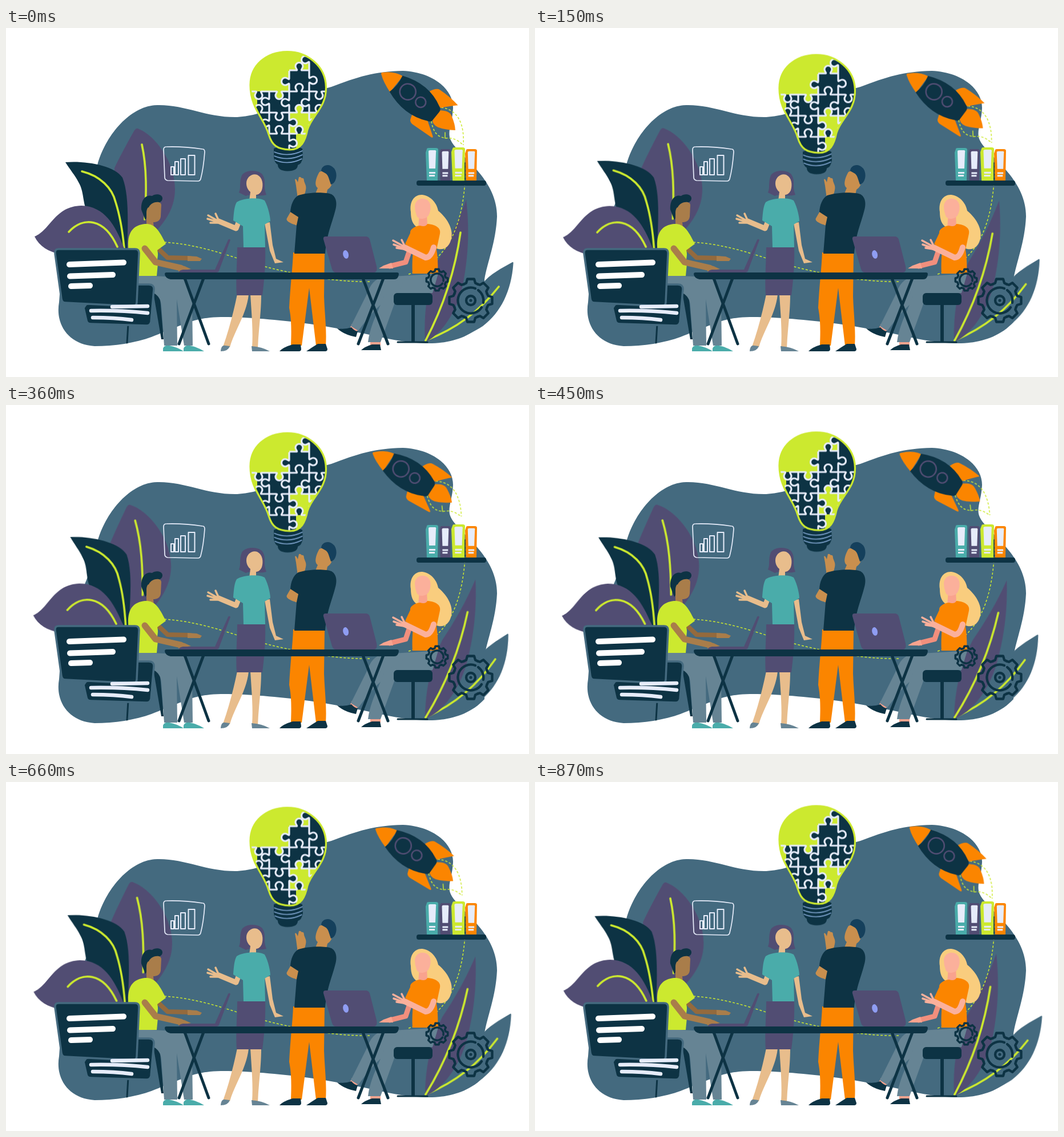
An HTML page without scripts that plays this animation: 916 by 611 pixels, repeating every 900 ms.

```html
<!DOCTYPE html>
<html lang="en">
<head>
<meta charset="utf-8">
<title>Team idea</title>
<style>
  html, body { margin: 0; width: 100%; height: 100%; overflow: hidden; background: #fff; }
  svg { display: block; width: 916px; height: 611px; }
  .blue { fill: #446a7f; } .dark { fill: #0d3344; } .purple { fill: #514d73; } .lime { fill: #cce92f; }
  .teal { fill: #4aacaa; } .orange { fill: #fb8500; } .grey { fill: #668494; }
  .tan { fill: #a97d4a; } .bronze { fill: #c98f4e; } .peach { fill: #e8bd8c; } .pink { fill: #f9a38e; } .paper { fill: #e6ecfa; }
  .line { fill: none; stroke-linecap: round; stroke-linejoin: round; }
  .ink { stroke: #0d3344; } .vein { stroke: #cce92f; stroke-width: 3.6; } .pale { stroke: #e6ecfa; }
  .dash { stroke: #cce92f; stroke-width: 1.5; stroke-dasharray: 4 3; stroke-linecap: butt; }

  .early, .mid, .late { animation: 900ms linear infinite; }
  .early { animation-name: early; }
  .mid { animation-name: mid; }
  .late { animation-name: late; }
  @keyframes early { 33.3% { transform: var(--to); } }
  @keyframes mid { 52% { transform: var(--to); } }
  @keyframes late { 60% { transform: var(--to); } }
  @keyframes bob { 28% { transform: translateY(9.2px); } }
  @keyframes fly { 50% { transform: rotate(-7deg); } }
  .bulb { animation: bob 900ms linear infinite; }
  .rocket { transform-origin: 700px 235px; animation: fly 900ms linear infinite; }
  .leaf-tall { transform-origin: 204px 394px; --to: rotate(-4.6deg); }
  .leaf-dark { transform-origin: 210px 450px; --to: rotate(2.5deg); }
  .leaf-low { transform-origin: 200px 475px; --to: rotate(-1.6deg); }
  .leaf-right { transform-origin: 735px 547px; --to: rotate(5.7deg); }
  .leaf-edge { transform-origin: 735px 547px; --to: rotate(-4deg); }
</style>
</head>
<body>
<svg viewBox="0 0 916 611">
  <defs>
    <path id="glass" d="M492 41.500C526 41 560 65 560.500 104C561 140 536 152 528 178C524 198 517 213 497 213C475 212 466 206 460 186C452 158 428 140 428 100C428 65 456 42 492 41.500Z"/>
    <clipPath id="in-glass"><use href="#glass"/></clipPath>
    <path id="knob" d="M0 0H12C16 0 11-3 11-7A6.500 6.500 0 0 1 24-7C24-3 19 0 23 0H36"/>
    <path id="tooth" d="M28.600-11.900L30.500-8L37.500-6V6L30.500 8L28.600 11.900"/>
    <g id="half-gear">
      <use href="#tooth"/><use href="#tooth" transform="rotate(45)"/>
      <use href="#tooth" transform="rotate(90)"/><use href="#tooth" transform="rotate(135)"/>
    </g>
    <g id="gear">
      <use href="#half-gear"/><use href="#half-gear" transform="rotate(180)"/>
      <path d="M8-21A22.500 22.500 0 1 0 19 12M13-18A22.500 22.500 0 0 1 22 4"/>
    </g>
    <g id="binder">
      <path d="M2 2Q2 0 5 0H18Q22 0 22 3L21 57H2L0 8Z"/>
      <path class="paper" d="M5 6Q5 4 8 4H17Q19 5 18 8L17 36H6ZM6 42H17V45H6ZM6 47H16V50H6Z"/>
    </g>
  </defs>

  <path class="blue" d="M160 240C175 185 220 135 265 135C315 134 350 157 405 156C465 152 510 119 570 103C615 86 645 76 695 75C745 77 783 105 783 140C782 165 773 180 778 194C788 222 860 260 860 330C858 375 843 410 838 440L838 515C810 545 770 553 735 552C680 550 650 538 600 530C530 515 440 507 390 506C330 505 320 517 280 530C245 548 200 557 155 557C110 554 86 520 93 480L100 385Q148 310 160 240Z"/>

  <!-- plants -->
  <g class="leaf-tall mid">
    <path class="purple" d="M231 176C262 188 296 235 296 282C296 320 275 350 225 390L204 394C195 340 190 290 190 245C203 218 216 195 225 179Q228 175 231 176Z"/>
    <path class="line vein" d="M238 204C247 245 246 290 243 335"/>
  </g>
  <g class="leaf-dark early">
    <path class="dark" d="M104 235C138 232 190 240 204 262C215 290 214 335 212 392H206C195 365 170 350 148 330C132 312 139 290 127 270C121 258 112 248 104 235Z"/>
    <path class="line vein" d="M133 251C165 259 186 280 192 305C200 330 204 355 207 385"/>
  </g>
  <g class="leaf-low mid">
    <path class="purple" d="M50 365C78 354 85 312 132 311C172 312 192 345 207 386L200 397L95 396C75 392 58 382 50 365Z"/>
    <path class="line vein" d="M110 357C135 330 172 332 195 383"/>
  </g>
  <g class="leaf-edge early">
    <path class="blue" d="M887 410Q889 409 888.500 413C885 460 867 498 835 522C800 545 760 552 735 549C750 520 790 468 834 448C848 430 868 421 887 410Z"/>
    <path class="line vein" d="M863 453C830 495 790 526 735 547"/>
  </g>
  <g class="leaf-right late">
    <path class="purple" d="M806 300C812 350 810 400 800 450C790 495 765 535 734 550C731 500 738 450 755 410C775 375 792 340 806 300Z"/>
    <path class="line vein" d="M796 358C788 415 770 480 735 547"/>
  </g>

  <path class="line dash" d="M277 375C355 380 415 410 475 423C540 438 590 445 640 444"/>
  <path class="line dash" d="M705 431C765 412 805 360 805 235"/>

  <!-- chart card -->
  <g class="line pale" stroke-width="1.700">
    <path d="M281 208Q310 207 344 212Q348 212 348 217Q346 245 341 264Q340 268 336 268L283 267Q278 266 278 261L276 213Q276 208 281 208Z"/>
    <path stroke-width="2" d="M289 257V243H294V257ZM296 257V234H302V257ZM306 257V229H314V257ZM319.500 257V223H330.500V257Z"/>
  </g>

  <!-- light bulb -->
  <g class="bulb">
    <path class="dark" d="M469 211Q494 200 519 211L520 226Q518 238 511 240Q511 250 493 250.500Q476 250 476 239Q470 236 469 226Z"/>
    <path class="line" stroke="#84a9d4" stroke-width="1.400" d="M470 217Q494 227 519 215M470 224Q494 234 519 222M471 231Q494 241 518 229"/>
    <use href="#glass" class="lime"/>
    <g clip-path="url(#in-glass)">
      <path class="dark" d="M531 51H565V148H496V185H531V214H440V111H496V74H531Z"/>
      <path class="lime" d="M496 148H531V185H496ZM508 185H531V214H508Z"/>
      <g class="pale dark" stroke-width="3.200">
        <use href="#knob" x="496" y="74"/>
        <use href="#knob" transform="translate(425 111)matrix(1 0 0-1 0 0)"/>
        <use href="#knob" x="461" y="111" style="fill:#cce92f" transform="matrix(1 0 0-1 0 222)"/>
        <use href="#knob" x="496" y="111"/>
        <use href="#knob" transform="translate(531 111)matrix(1 0 0-1 0 0)"/>
        <use href="#knob" x="425" y="148"/>
        <use href="#knob" transform="translate(461 148)matrix(1 0 0-1 0 0)"/>
        <use href="#knob" x="496" y="148" class="lime"/>
        <use href="#knob" x="531" y="148"/>
        <use href="#knob" x="461" y="185"/>
        <use href="#knob" x="496" y="185"/>
        <use href="#knob" transform="translate(496 111)rotate(-90)"/>
        <use href="#knob" transform="translate(531 38)rotate(90)matrix(1 0 0-1 0 0)"/>
        <use href="#knob" transform="translate(531 74)rotate(90)"/>
        <use href="#knob" transform="translate(531 148)rotate(-90)"/>
        <use href="#knob" transform="translate(496 148)rotate(-90)"/>
        <use href="#knob" transform="translate(461 111)rotate(90)matrix(1 0 0-1 0 0)"/>
        <use href="#knob" transform="translate(461 184)rotate(-90)"/>
        <use href="#knob" transform="translate(496 148)rotate(90)"/>
        <use href="#knob" transform="translate(531 148)rotate(90)" class="lime"/>
        <use href="#knob" transform="translate(496 184)rotate(90)"/>
      </g>
    </g>
    <use href="#glass" fill="none" stroke="#cce92f" stroke-width="3.200"/>
  </g>

  <!-- shelf -->
  <rect class="dark" x="719" y="267" width="122" height="9" rx="4"/>
  <use href="#binder" class="teal" x="735" y="210"/>
  <use href="#binder" class="purple" transform="translate(759 212)scale(.9 .965)"/>
  <use href="#binder" class="lime" transform="translate(780 209)scale(1.090 1.020)"/>
  <use href="#binder" class="orange" transform="translate(804 212)scale(.95 .965)"/>
  <path class="line ink" stroke-width="1.500" d="M804 236V266"/>

  <g class="rocket">
    <path class="line dash" d="M762 139C792 143 803 168 801 205M745 163C749 188 760 191 770 193C784 191 793 198 801 205"/>
    <path class="line" stroke="#cce92f" stroke-width="1.500" d="M769 183V193"/>
    <g transform="translate(659 78)rotate(39)">
      <path class="orange" d="M84-24Q90-39 97-40Q118-42 139-39Q130-30 118-16ZM86 22L90 33Q92 37 98 37L138 34Q142 33 139 31L114 15ZM120-12Q134-23 143-17Q156-10 163-2Q148 9 136 13Q124 16 119 7Z"/>
      <path class="orange" d="M1-1Q14-15 32-18V18Q12 12 0 3Q-2 1 1-1Z"/>
      <path class="dark" d="M31-18Q76-37 115-17Q121-15 121-9V10Q121 14 115 16Q76 35 31 18Q36 0 31-18Z"/>
      <g class="line" stroke="#514d73" stroke-width="2.600"><circle cx="56" cy="-2" r="14"/><circle cx="85" cy="-2" r="9"/></g>
    </g>
  </g>

  <!-- seated man -->
  <path class="dark" d="M258 463H269L276 545H272Z"/>
  <path class="grey" d="M230 433L300 436C320 440 326 460 326 480L327 556H312L299 475L300 556H277L272 485C270 465 255 460 232 458Z"/>
  <g class="teal"><path id="slip" d="M275 566V561Q277 555 286 556Q301 559 311 566Z"/><use href="#slip" x="36"/></g>
  <path class="line" stroke="#946a3d" stroke-width="8" d="M264 384L283 402L322 403"/>
  <path class="tan" d="M318 399L334 400L343 404L340 408L318 408Z"/>
  <path class="dark" d="M237 318C236 300 245 291 256 294C262 289 275 291 274 299C273 306 266 306 262 307L254 320L244 336Z"/>
  <path class="tan" d="M250 314C255 303 272 302 272 310L271 330C270 338 264 340 258 340L259 350H246V322Q247 314 250 314Z"/>
  <path class="lime" d="M214 382C213 355 225 345 243 343C260 342 267 352 280 378L265 389C268 400 263 404 266 413L264 434H216Z"/>
  <path class="line" stroke="#a97d4a" stroke-width="11" d="M243 386L262 410L306 420"/>
  <path class="tan" d="M300 414L313 417L324 422L302 426Z"/>

  <!-- standing woman -->
  <path class="peach" d="M405 466H425C422 500 400 530 392 559L380 558C390 530 398 500 405 466ZM428 466H447C447 500 442 530 441 561L431 559C433 530 430 500 428 466Z"/>
  <path class="grey" d="M376 566Q377 554 384 556L392 557Q389 566 376 566ZM430 557Q448 558 462 566H431Z"/>
  <path class="purple" d="M405 384H454C455 415 452 445 449 468H404C402 440 405 410 405 384Z"/>
  <path class="purple" d="M413 258C420 247 445 248 450 258C456 268 450 278 456 292C440 296 430 290 420 294L408 288C412 280 408 270 413 258Z"/>
  <path class="peach" d="M421 272C421 262 430 254 440 257C450 262 451 275 448 284C445 291 440 292 438 292V303H426L428 287C423 283 421 277 421 272Z"/>
  <path class="line" stroke="#e8bd8c" stroke-width="9" d="M408 338L403 351L372 338"/>
  <path class="line" stroke="#e8bd8c" stroke-width="3.500" d="M370 337L354 328M369 339L353 334M371 341L358 341M372 336L367 325"/>
  <path class="peach" d="M453 342L462 340L467 380L473 404L486 410L471 412L462 390Z"/>
  <path class="teal" d="M404 305C415 297 445 296 453 302C460 315 463 332 463 338L453 344L454 384H416L415 347L398 337C399 322 400 312 404 305Z"/>

  <!-- standing man -->
  <path class="orange" d="M503 393H558L557 470C558 500 562 530 560 556H543L531 455L518 556H499C500 530 500 510 496 490C498 450 502 420 503 393Z"/>
  <path class="dark" d="M479 566Q485 559 502 554H516L517 562Q517 566 513 566ZM526 566Q536 559 546 553H560L563 562Q563 566 559 566Z"/>
  <path class="bronze" d="M510 291L508 276L506 265Q508 263 511 270L513 261Q516 260 518 263Q522 262 522 268L525 276C527 283 522 290 522 300H511ZM500 319L514 328L511 346C500 343 489 338 492 333Z"/>
  <path class="pink" d="M562 342L567 345L561 352Z"/>
  <path class="bronze" d="M549 252C557 248 567 255 566 262L571 266C572 278 565 281 563 283L561 292H541L546 280C538 275 545 258 549 252Z"/>
  <path fill="#15405c" d="M552 250C553 239 567 236 575 246C582 256 578 272 569 274L565 262C562 253 557 254 552 250Z"/>
  <path class="dark" d="M512 293C530 287 560 287 570 291C580 297 580 310 576 322C570 345 562 360 559 395H505L509 345L512 331L498 322C499 310 503 298 512 293Z"/>

  <!-- seated woman -->
  <path class="line ink" stroke-width="6" d="M713 485V548"/>
  <path class="line ink" stroke-width="3" d="M686 550H738"/>
  <path class="pink" d="M606 518L618 527L612 534L602 526ZM638 546H656V556H638Z"/>
  <path class="grey" d="M745 431L660 436C645 440 638 450 634 462L604 522L617 530C640 500 655 478 690 466L747 464L757 430Z"/>
  <path class="grey" d="M662 470C650 500 638 520 634 550H656L682 478C690 458 692 450 700 440Z"/>
  <path class="dark" d="M580 526Q594 528 605 524Q610 530 616 531L613 541Q592 537 580 526ZM622 564Q628 558 641 554H655L657 564Z"/>
  <rect class="dark" x="679" y="464" width="68" height="21" rx="6"/>
  <path fill="#f9cd7e" d="M709 322C706 303 716 291 729 292C745 294 755 308 757 320C775 335 785 355 779 372C775 385 764 391 752 385L745 350H722C712 345 709 335 709 322Z"/>
  <path class="pink" d="M724 326H737L738 346L722 350Z"/>
  <path fill="#fbb09b" d="M716 312C717 301 726 296 736 300C746 305 745 320 740 328C736 335 722 337 719 328Q716 320 716 312Z"/>
  <path class="line" stroke="#f18f7d" stroke-width="9" d="M709 383L700 410L672 417"/>
  <path fill="#f9a38e" d="M675 411L661 416L653 421H678Z"/>
  <path class="orange" d="M708 359C707 353 715 347 725 346Q735 349 738 343C755 344 762 352 760 360L754 388C757 405 756 420 757 430H712C711 415 712 400 713 391L699 378Z"/>
  <path class="line" stroke="#fbb09b" stroke-width="10" d="M749 384Q744 402 735 402L698 384"/>
  <path class="line" stroke="#fbb09b" stroke-width="3.500" d="M700 384L678 372M698 386L679 379M697 387L684 385M698 381L693 371"/>

  <!-- table and laptops -->
  <path class="purple" d="M389 371Q391 368 393 371L373 425Q372 428 368 428H303Q303 424 310 423H366ZM560 365H630Q635 365 637 370L649 417Q651 427 645 428H578Q573 428 571 422L556 370Q555 365 560 365Z"/>
  <ellipse cx="595" cy="396.500" rx="4.800" ry="7.500" fill="#8f9df2" transform="rotate(-14 595 396)"/>
  <path class="line ink" stroke-width="5" d="M313 438L355 553M346 438L303 553M625 438L669 553M661 438L617 553"/>
  <path class="dark" d="M281 428H685Q688 428 688 431Q687 440 680 440H288Q279 438 278 431Q278 428 281 428Z"/>

  <!-- screens -->
  <path class="line ink" stroke-width="3" d="M214 518L212 551"/>
  <g class="dark" stroke="#446a7f" stroke-width="3.500">
    <path d="M140 484L232 449H250Q259 449 259 457L254 514Q253 521 246 521L149 518Q142 518 141 512L136 490Z"/>
    <path d="M92 387H226Q233 387 233 394L229 480Q229 487 222 487L104 481Q98 481 97 474L86 395Q85 387 92 387Z"/>
  </g>
  <path class="line" stroke="#fff" stroke-width="10" d="M111 414L206 410.500M112 434.500L187 432M114 452L147 451"/>
  <path class="line pale" stroke-width="6.500" d="M186 488L248 487M149 495Q200 494 248 499M152 507Q190 507 220 511"/>

  <g class="line ink">
    <use href="#gear" transform="translate(755 441)scale(.5)" stroke-width="7"/>
    <g transform="translate(814 477)" stroke-width="4.300"><use href="#gear"/><circle r="8"/><circle r="1.500" stroke-width="2"/></g>
  </g>
</svg>
</body>
</html>
```
